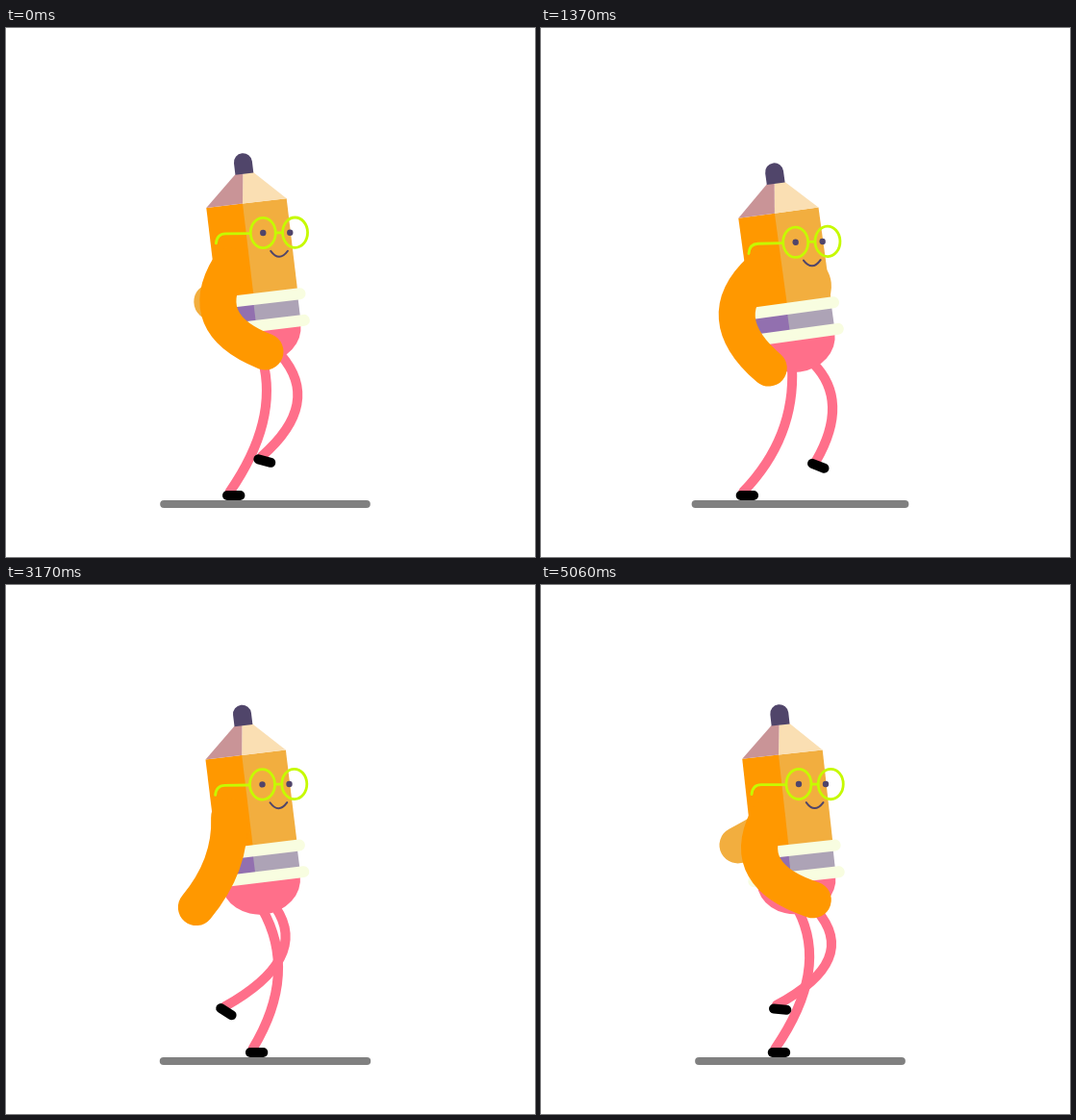
Animation of 550 by 550 pixels, one loop 5090 ms. Source, as an HTML page with a canvas:

```html
<!DOCTYPE html>
<html lang="en">
<head>
<meta charset="utf-8">
<title>Walking pencil</title>
<style>
  html, body { margin: 0; width: 100%; height: 100%; overflow: hidden; background: #fff; }
  canvas { display: block; width: 550px; height: 550px; }
</style>
</head>
<body>
<canvas id="stage" width="550" height="550"></canvas>
<script>
const ctx = document.getElementById('stage').getContext('2d');
const LOOP = 5090, CYCLE = LOOP / 4, BLINK = 840;
const ORANGE = '#ff9800', AMBER = '#f2ae3f', PINK = '#ff6f8a', INK = '#50456a';
const CREAM = '#f8fde0', LIME = '#c6fa00';

// Each row: phase of the walk cycle, then the values at that phase.
// base x, base y, lean in degrees, half width of the ground
const BODY = [
  [0, 269.8, 347.8, 6.8, 109.3],
  [.067, 269.5, 357, 7.6, 112.3],
  [.17, 270.5, 361, 10.5, 119],
  [.25, 272.5, 356.5, 13, 121.3],
  [.356, 273.4, 346.7, 13.2, 118.5],
  [.455, 270.5, 341, 8.4, 111.5],
  [.524, 268.8, 344.5, 6.3, 109],
  [.66, 269, 359.5, 9, 116.2],
  [.71, 270, 361, 10.5, 119.5],
  [.77, 271.5, 359, 11.8, 121.3],
  [.853, 272, 351.8, 11.3, 117],
  [.976, 269.3, 342, 6.3, 109.4]
];

// hip offset, curve control, shoe centre, shoe angle
const LEG_A = [
  [0, 16, -8, 329, 390, 268.5, 450, 15],
  [.067, 14, -9, 322, 388, 286, 454.5, 22],
  [.24, 4, -4, 318, 385, 317, 469, -12],
  [.356, -4, 0, 308, 392, 318, 484.5, -22],
  [.42, 0, -4, 312, 415, 294, 486, 0],
  [.524, -5, -6, 298, 400, 248, 486, 0],
  [.66, -11, 0, 253, 430, 213, 486, 0],
  [.77, -14, 0, 250, 428, 199, 478, 26],
  [.853, -9, -2, 270, 410, 205, 464, 52],
  [.976, 17, -4, 332, 390, 248, 441, 5]
];
const LEG_B = [
  [0, -3, -3, 284, 408, 237, 486, 0],
  [.067, -8, -5, 266, 425, 216, 486, 0],
  [.22, -14, -2, 252, 430, 200, 485, 8],
  [.356, -18, 0, 240, 430, 199.5, 477.5, 28],
  [.43, -4, -3, 272, 408, 208, 458, 46],
  [.524, 15, -8, 327, 384, 242, 440.5, 22],
  [.66, 15, -11, 325, 388, 293.5, 454, -16],
  [.77, -2, -2, 310, 394, 317, 484, -20],
  [.853, 3, -4, 310, 420, 300.5, 486, -4],
  [.976, -2, -4, 300, 400, 248, 486, 0]
];

// shoulder, curve control and hand, measured from the shoulder anchor
const NEAR_ARM = [
  [0, -2, -2, -39, 58, 35, 87],
  [.067, -4, -8, -58, 42, 8, 94],
  [.22, -6, -9, -50, 34, -46, 86],
  [.356, -5, -9, -39, 33, -42, 93.5],
  [.524, -1, -2, 9, 49, -34, 91],
  [.66, 8, -7, 36, 48, 19, 96],
  [.853, 9, -4, 10, 44, 77, 70],
  [.976, 0, 0, -29, 59, 48, 84]
];
const FAR_ARM = [
  [0, 25, -6, 22, 4, -21, 35],
  [.067, 25, -6, 72, -5, 30, 45],
  [.356, 25, -6, 66, 0, 44, 40],
  [.524, 25, -6, 45, 15, 30, 55],
  [.66, 25, -6, 5, 10, -8, 48.5],
  [.853, 25, -6, -4, 7, -44, 14],
  [.976, 25, -6, 5, 8, -31, 27]
];

// Periodic monotone cubic through the rows
function pose(rows, p) {
  const n = rows.length;
  const at = i => rows[((i % n) + n) % n];
  const time = i => at(i)[0] + Math.floor(i / n);
  let i = n - 1;
  while (rows[i][0] > p) i--;
  const h = time(i + 1) - time(i), u = (p - time(i)) / h;
  return at(i).slice(1).map((v, k) => {
    const val = j => at(j)[k + 1];
    const slope = j => (val(j + 1) - val(j)) / (time(j + 1) - time(j));
    const tangent = j => {
      const a = slope(j - 1), b = slope(j);
      return a * b <= 0 ? 0 : 2 * a * b / (a + b);
    };
    const w = val(i + 1), u2 = u * u, u3 = u2 * u;
    return v * (2 * u3 - 3 * u2 + 1) + w * (3 * u2 - 2 * u3) +
      h * (tangent(i) * (u3 - 2 * u2 + u) + tangent(i + 1) * (u3 - u2));
  });
}

function poly(color, ...pts) {
  ctx.fillStyle = color;
  ctx.beginPath();
  for (let i = 0; i < pts.length; i += 2) ctx.lineTo(pts[i], pts[i + 1]);
  ctx.fill();
}

function box(color, x, y, w, h) {
  ctx.fillStyle = color;
  ctx.fillRect(x, y, w, h);
}

function oval(x, y, rx, ry) {
  ctx.beginPath();
  ctx.ellipse(x, y, rx, ry, 0, 0, Math.PI * 2);
}

function stroke(color, width) {
  ctx.strokeStyle = color;
  ctx.lineWidth = width;
  ctx.stroke();
}

function curve(color, width, x0, y0, cx, cy, x1, y1) {
  ctx.beginPath();
  ctx.moveTo(x0, y0);
  ctx.quadraticCurveTo(cx, cy, x1, y1);
  stroke(color, width);
}

function line(color, width, x0, y0, x1, y1) {
  curve(color, width, x0, y0, (x0 + x1) / 2, (y0 + y1) / 2, x1, y1);
}

function arm(rows, p, color, ax, ay) {
  const [sx, sy, cx, cy, hx, hy] = pose(rows, p);
  curve(color, 38, ax + sx, ay + sy, ax + cx, ay + cy, ax + hx, ay + hy);
}

function leg(rows, p, bx, by) {
  const [hx, hy, cx, cy, fx, fy, deg] = pose(rows, p);
  const a = deg * Math.PI / 180, c = Math.cos(a), s = Math.sin(a);
  curve(PINK, 10, bx + hx, by + hy, cx, cy, fx - 4 * c + 4 * s, fy - 4 * s - 4 * c);
  ctx.save();
  ctx.translate(fx, fy);
  ctx.rotate(a);
  curve('#000', 10, -6.7, 0, 1, Math.max(0, -deg - 6) * .4, 6.7, 0);
  ctx.restore();
}

function face(open) {
  ctx.save();
  ctx.translate(13.5, 32.7);
  ctx.rotate(.11);
  ctx.fillStyle = INK;
  for (const x of [0, 28]) {
    oval(x, 0, 3.2, .7 + 2.5 * open);
    ctx.fill();
  }
  curve(INK, 2, 7.8, 19, 16.5, 31, 25.5, 19);
  for (const x of [0, 33.3]) {
    oval(x, 0, 13, 15.7);
    stroke(LIME, 2.8);
  }
  line(LIME, 2.8, 13.5, 0, 20, 0);
  ctx.beginPath();
  ctx.moveTo(-13.5, .5);
  ctx.lineTo(-39, .5);
  ctx.quadraticCurveTo(-48, .5, -49, 10.5);
  stroke(LIME, 2.8);
  ctx.restore();
}

function pencil(open) {
  // eraser
  ctx.fillStyle = PINK;
  ctx.beginPath();
  ctx.moveTo(-41, 126);
  ctx.lineTo(-41, 132);
  ctx.ellipse(0, 132, 41, 35, 0, Math.PI, 0, true);
  ctx.lineTo(41, 126);
  ctx.fill();

  // wood and sleeve
  box(AMBER, -6, 0, 48, 98);
  box(ORANGE, -42, 0, 38, 98);
  box('#ada3b6', -8, 104, 49.5, 22);
  box('#9270af', -42, 104, 37, 22);
  line(CREAM, 12, -44, 100, 44, 100);
  line(CREAM, 12, -44, 128, 45, 128);

  // tip
  poly('#fadfb3', -4, 0, 0, -31, 11, -31, 42, 0);
  poly('#c99497', -42, 0, -8, -31, 0, -31, -4, 0);
  ctx.fillStyle = INK;
  ctx.beginPath();
  ctx.moveTo(-8, -30.5);
  ctx.arc(1.5, -42.5, 9.5, Math.PI, 0);
  ctx.lineTo(11, -30.5);
  ctx.fill();

  face(open);
}

function draw(t) {
  const p = (t / CYCLE) % 1;
  const [bx, by, lean, half] = pose(BODY, p);
  const a = lean * Math.PI / 180, s = Math.sin(a), c = Math.cos(a);
  const ox = bx - 167 * s, oy = by - 167 * c;
  const ax = ox - 23 * c + 65 * s, ay = oy + 23 * s + 65 * c;
  const open = Math.min(1, Math.max(0, (Math.abs(t - BLINK) - 25) / 75));

  ctx.fillStyle = '#fff';
  ctx.fillRect(0, 0, 550, 550);
  ctx.lineCap = 'round';
  line('#808080', 8, 269.5 - half + 4, 495, 269.5 + half - 4, 495);

  arm(FAR_ARM, p, AMBER, ax, ay);
  leg(LEG_B, p, bx, by);
  leg(LEG_A, p, bx, by);

  ctx.save();
  ctx.translate(ox, oy);
  ctx.rotate(-a);
  pencil(open);
  ctx.restore();

  arm(NEAR_ARM, p, ORANGE, ax, ay);
}

const start = performance.now();
function tick() {
  draw((performance.now() - start) % LOOP);
  requestAnimationFrame(tick);
}
tick();
</script>
</body>
</html>
```
